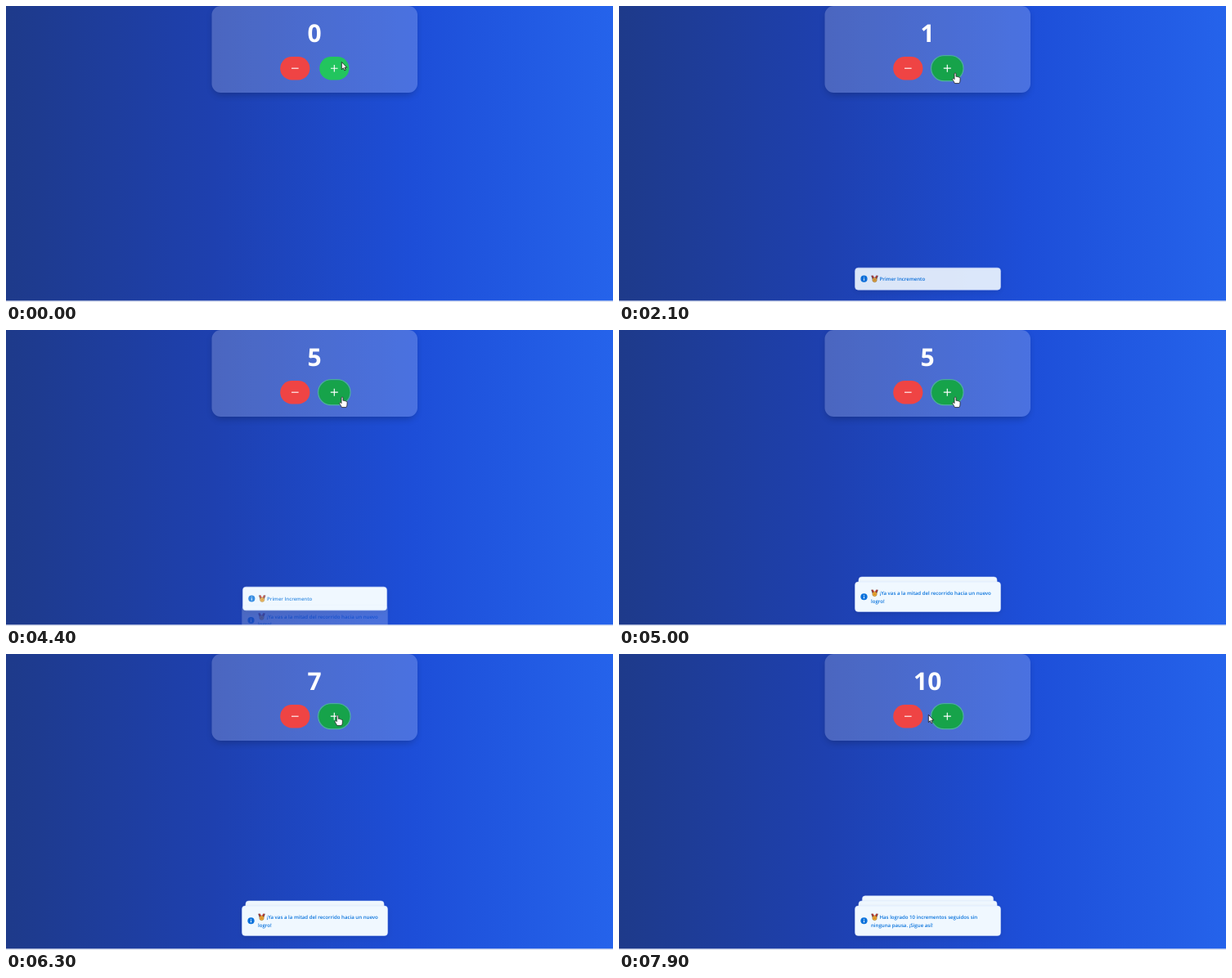
Animation of 742 by 362 pixels, one loop 8000 ms. Source, as an HTML page:

```html
<!DOCTYPE html>
<html lang="es">
<head>
<meta charset="utf-8">
<title>Contador</title>
<style>
  html, body { margin: 0; width: 100%; height: 100%; overflow: hidden; background: #1e40af; }
  svg { display: block; width: 742px; height: 362px; }
  text { font-family: "Open Sans", "Noto Sans", sans-serif; text-rendering: geometricPrecision; }
  .count { font: 700 30px "Noto Sans", "Open Sans", sans-serif; fill: #fff; text-anchor: middle; }
  .msg { font-size: 6.1px; font-weight: 600; fill: #0973dc; }
  .sign { stroke: #fff; stroke-width: 1.1; fill: none; }
</style>
</head>
<body>
<svg viewBox="0 0 742 362" xmlns="http://www.w3.org/2000/svg">
  <defs>
    <linearGradient id="bg">
      <stop offset="0" stop-color="#1e3a8a"/>
      <stop offset=".34" stop-color="#1e40af"/>
      <stop offset=".67" stop-color="#1d4ed8"/>
      <stop offset="1" stop-color="#2563eb"/>
    </linearGradient>
    <filter id="blur" x="-20%" y="-30%" width="140%" height="160%"><feGaussianBlur stdDeviation="4"/></filter>
    <filter id="soft" x="-10%" y="-40%" width="120%" height="180%">
      <feDropShadow dx="0" dy="2" stdDeviation="3" flood-opacity=".1"/>
    </filter>
    <clipPath id="outside">
      <path clip-rule="evenodd" d="M200 0H560V140H200ZM262.5 0H492a11 11 0 0 1 11 11V95a11 11 0 0 1 -11 11H262.5a11 11 0 0 1 -11 -11V11a11 11 0 0 1 11 -11Z"/>
    </clipPath>
    <g id="medal">
      <path d="M0 -4H2.6L4.3 -.5 6 -4H8.6L6.7 1.2H1.9Z" fill="#5a3434"/>
      <path d="M1 -4H2.4L4.3 0 6.2 -4H7.6L5.6 .8H3Z" fill="#d8433b"/>
      <circle cx="4.3" cy="1.3" r="2.7" fill="#f3b63a" stroke="#8a5a1c" stroke-width=".5"/>
      <circle cx="4.3" cy="1.3" r="1.2" fill="#d98324"/>
    </g>
    <g id="info">
      <circle r="4.1" fill="#0973dc"/>
      <path d="M0 -.5V2.2M0 -2.2V-1.3" stroke="#f0f8ff" stroke-width="1"/>
    </g>
  </defs>

  <rect width="742" height="362" fill="url(#bg)"/>
  <g clip-path="url(#outside)">
    <rect x="253" y="4" width="248" height="105" rx="11" fill="#000" opacity=".2" filter="url(#blur)"/>
  </g>
  <rect x="251.5" width="251.5" height="106" rx="11" fill="#fff" fill-opacity=".2"/>
  <text id="count" class="count" x="377.2" y="43.5">0</text>

  <rect x="335.2" y="62" width="36.2" height="28.4" rx="14.2" fill="#ef4444"/>
  <path class="sign" d="M349 76.2H357.6"/>
  <g id="plus">
    <rect id="ring" x="-18.7" y="-14.8" width="37.4" height="29.6" rx="14.8" fill="none" stroke="#4cc38a" stroke-width="1"/>
    <rect id="face" x="-18.1" y="-14.2" width="36.2" height="28.4" rx="14.2"/>
    <path class="sign" d="M-4.3 0H4.3M0 -4.3V4.3"/>
  </g>

  <g id="toasts"></g>
  <rect y="360.4" width="742" height="1.6" fill="#e6eaf4"/>

  <g id="cursor" stroke-linejoin="round">
    <path id="arrow" d="M0 0V9.2L2.1 7.3 3.5 10.4 5 9.7 3.6 6.7H6.4Z" fill="#fff" stroke="#111" stroke-width=".8"/>
    <path id="hand" d="M-1 .6Q0 -.9 1 .6V4.4Q2.2 3.6 2.8 4.8 4 4.1 4.5 5.3 6 4.8 6 6.4V9Q6 11 4.8 12.6H-.6Q-1.4 10.6 -3 8.4 -3.8 7 -2.5 6.6 -1.7 6.5 -1 7.6Z" fill="#fff" stroke="#222" stroke-width=".8"/>
  </g>
</svg>

<script>
const LOOP = 8000, STEP = 100;
const BOTTOM = 344.5, LEFT = 288.5, WIDTH = 178, GAP = 7, TALL = 36.5;
const $ = id => document.getElementById(id);
const clamp = v => Math.min(1, Math.max(0, v));
const mix = (a, b, p) => a + (b - a) * p;

// CSS "ease": cubic-bezier(.25, .1, .25, 1)
function ease(x) {
  if (x <= 0 || x >= 1) return clamp(x);
  const curve = (a, b, u) => 3 * a * u * (1 - u) ** 2 + 3 * b * u * u * (1 - u) + u ** 3;
  let lo = 0, hi = 1;
  for (let i = 0; i < 24; i++) {
    const mid = (lo + hi) / 2;
    if (curve(.25, .25, mid) < x) lo = mid; else hi = mid;
  }
  return curve(.1, 1, lo);
}
const tween = (t, start, length) => ease((t - start) / length);

const clicks = [1500, 3000, 3400, 3600, 3800, 6100, 6300, 6500, 6700, 6900];

// time, x, y of the pointer tip
const path = [
  [600, 410.3, 68.5], [900, 411, 82], [5300, 411, 82], [5800, 405.3, 75],
  [6400, 405.3, 75], [6500, 409.5, 79], [7400, 409.5, 79], [7800, 378.3, 74.3]
];

function pointer(t) {
  const i = path.findIndex(k => k[0] > t);
  if (i === 0) return path[0].slice(1);
  if (i < 0) return path[path.length - 1].slice(1);
  const [a, b] = [path[i - 1], path[i]];
  const p = (t - a[0]) / (b[0] - a[0]);
  return [mix(a[1], b[1], p), mix(a[2], b[2], p)];
}

const toasts = [
  { start: 1850, height: 27, lines: ["Primer Incremento"] },
  { start: 4335, height: TALL, lines: ["¡Ya vas a la mitad del recorrido hacia un nuevo", "logro!"] },
  { start: 7350, height: TALL, lines: ["Has logrado 10 incrementos seguidos sin", "ninguna pausa. ¡Sigue así!"] }
];

function add(parent, name, attrs) {
  const el = document.createElementNS("http://www.w3.org/2000/svg", name);
  set(el, attrs);
  return parent.appendChild(el);
}
function set(el, attrs) {
  for (const k in attrs) el.setAttribute(k, attrs[k]);
}

for (const toast of toasts) {
  const { lines } = toast;
  toast.el = add($("toasts"), "g", {});
  toast.box = add(toast.el, "rect", {
    x: -WIDTH / 2, width: WIDTH, rx: 4, fill: "#f0f8ff",
    stroke: "#d3e0fd", "stroke-width": .5, filter: "url(#soft)"
  });
  toast.body = add(toast.el, "g", {});
  const top = lines.length > 1 ? -4.6 : 0;
  add(toast.body, "use", { href: "#info", x: -78, y: 0 });
  add(toast.body, "use", { href: "#medal", x: -69.3, y: top });
  lines.forEach((line, i) => {
    add(toast.body, "text", { class: "msg", x: i ? -69.5 : -59, y: top + 2.2 + i * 9.8 }).textContent = line;
  });
}

function drawToasts(t) {
  let depth = 0;
  for (let i = toasts.length - 1; i >= 0; i--) {
    const { start, height, el, box, body } = toasts[i];
    const shown = tween(t, start, 400);
    const back = clamp(depth);
    const h = mix(height, TALL, back);
    const y = BOTTOM - h / 2 - GAP * depth + (1 - shown) * h;
    set(el, {
      transform: `translate(${LEFT + WIDTH / 2} ${y}) scale(${1 - .05 * depth})`,
      opacity: shown
    });
    set(box, { y: -h / 2, height: h });
    set(body, { opacity: 1 - back });
    depth += shown;
  }
}

function draw(t) {
  $("count").textContent = clicks.filter(c => c <= t).length;

  const hover = tween(t, 600, 300);
  const shade = [[34, 22], [197, 163], [94, 74]].map(([a, b]) => Math.round(mix(a, b, hover)));
  set($("face"), { fill: `rgb(${shade})` });
  set($("plus"), { transform: `translate(401.3 76.2) scale(${1 + .05 * hover})` });
  set($("ring"), { opacity: t >= clicks[0] ? 1 : 0 });

  drawToasts(t);

  const [x, y] = pointer(t);
  const link = t >= 700 && x > 381;
  set($("cursor"), { transform: `translate(${x} ${y})` });
  set($("hand"), { opacity: link ? 1 : 0 });
  set($("arrow"), { opacity: link ? 0 : 1 });
}

const begin = performance.now();
function tick() {
  const t = (performance.now() - begin) % LOOP;
  draw(Math.floor(t / STEP) * STEP);
  requestAnimationFrame(tick);
}
tick();
</script>
</body>
</html>
```
